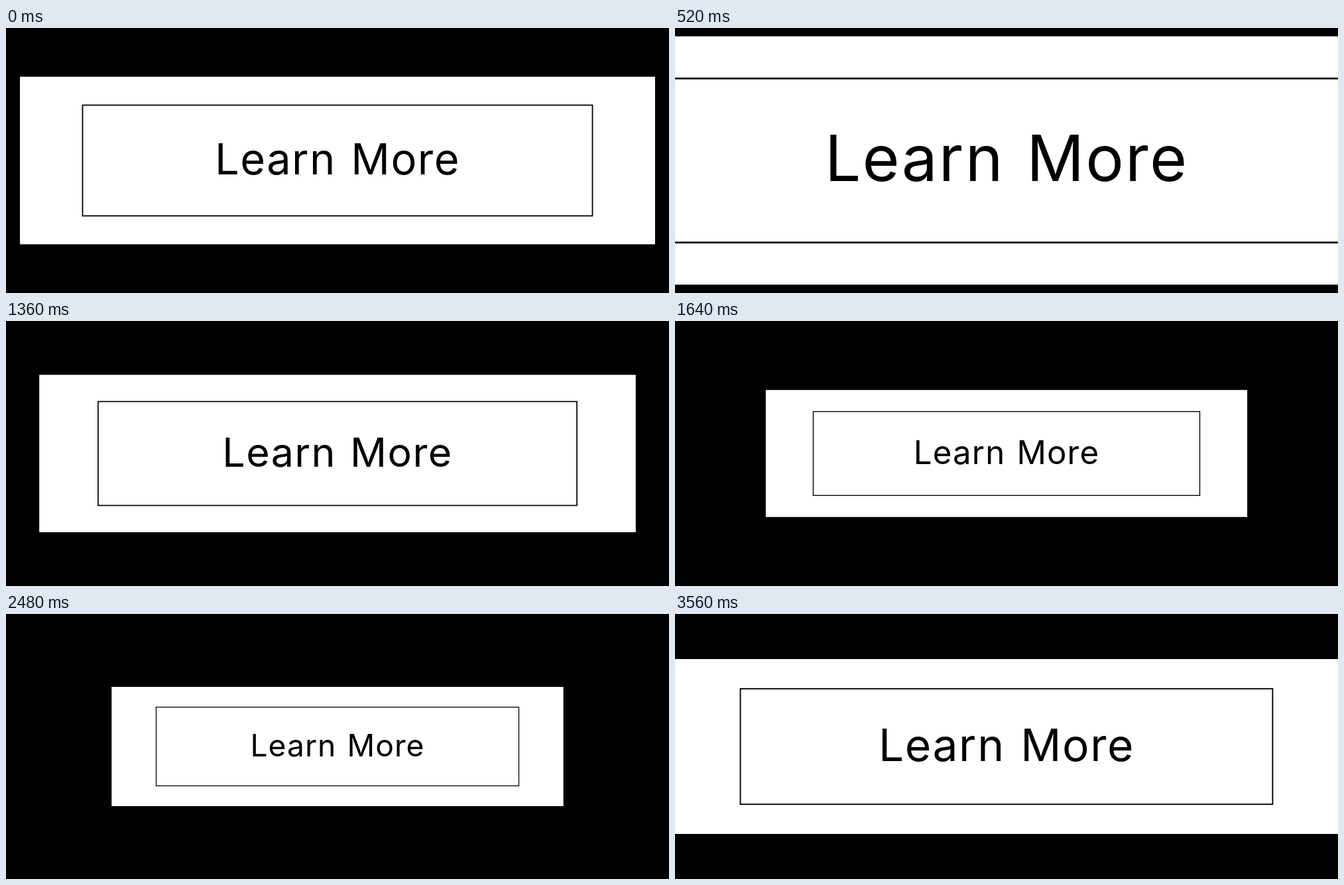
Write an HTML page with a canvas that moves like this. It is 1000 by 400 pixels and loops after 7560 ms.

```html
<!DOCTYPE html>
<html lang="en">
<head>
<meta charset="utf-8">
<title>Learn More</title>
<style>
  html, body { margin: 0; width: 100%; height: 100%; overflow: hidden; background: #000; }
  canvas { display: block; }
</style>
</head>
<body>
<canvas id="stage" width="1000" height="400"></canvas>
<script>
  const ctx = document.getElementById('stage').getContext('2d');
  const LOOP = 7560, STEP = 40;
  const LABEL = 'Learn More';

  // [time in ms, scale], linear in between, last value held
  const KEYS = [[0, 0.958], [360, 1.519], [1960, 0.528], [3560, 1]];

  function scaleAt(t) {
    for (let i = 1; i < KEYS.length; i++) {
      const [t0, s0] = KEYS[i - 1], [t1, s1] = KEYS[i];
      if (t <= t1) return s0 + (s1 - s0) * (t - t0) / (t1 - t0);
    }
    return KEYS[KEYS.length - 1][1];
  }

  function setFont() {
    ctx.font = '400 67.8px Inter, "Open Sans", sans-serif';
    ctx.letterSpacing = '1.5px';
    ctx.wordSpacing = '3px';
    ctx.textAlign = 'left';
    ctx.textBaseline = 'alphabetic';
  }

  setFont();
  const ink = ctx.measureText(LABEL);
  const labelX = 0.5 + (ink.actualBoundingBoxLeft - ink.actualBoundingBoxRight) / 2;

  function draw(t) {
    const s = scaleAt(t);
    ctx.setTransform(1, 0, 0, 1, 0, 0);
    ctx.fillStyle = '#000';
    ctx.fillRect(0, 0, 1000, 400);

    ctx.setTransform(s, 0, 0, s, 500, 200);
    ctx.fillStyle = '#fff';
    ctx.fillRect(-500, -132, 1000, 264);

    ctx.strokeStyle = '#000';
    ctx.lineWidth = 1.9;
    ctx.strokeRect(-401.4, -87.2, 802.8, 174.4);

    ctx.fillStyle = '#000';
    setFont();
    ctx.fillText(LABEL, labelX, 21.8);
  }

  function tick() {
    const t = performance.now() % LOOP;
    draw(Math.floor(t / STEP) * STEP);
    requestAnimationFrame(tick);
  }
  tick();
</script>
</body>
</html>
```
